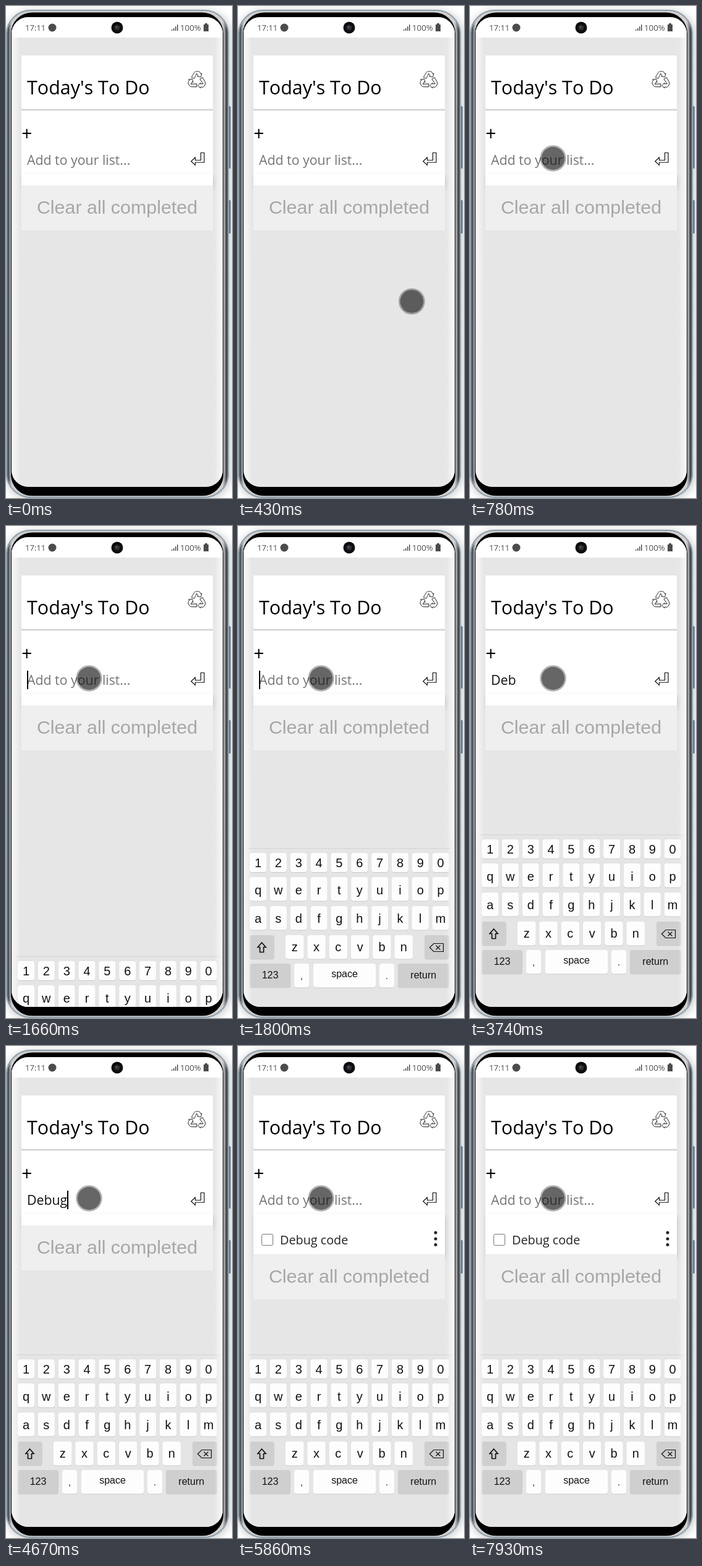
Recreate the animation shown at these times as an HTML page. Size 366 px wide and 796 px high, loop 8000 ms.

```html
<!DOCTYPE html>
<html lang="en">
<head>
<meta charset="utf-8">
<title>To-do list on a phone</title>
<style>
html, body { margin: 0; width: 100%; height: 100%; overflow: hidden; background: #fff; }
svg { display: block; width: 366px; height: 796px; }
text { font-family: "Open Sans", sans-serif; white-space: pre; }
.key text, .clear text { font-family: "Liberation Sans", Arial, sans-serif; text-anchor: middle; }
.key text { fill: #111; }
.title { font-kerning: none; }
.line { fill: none; stroke: #111; stroke-width: 1.2; }
</style>
</head>
<body>
<svg viewBox="0 0 366 796">
  <defs>
    <clipPath id="screen"><rect x="9" y="18" width="342" height="760" rx="27"/></clipPath>
    <filter id="soft" x="-20%" y="-20%" width="140%" height="140%"><feGaussianBlur stdDeviation="7"/></filter>
    <filter id="soft2" x="-20%" y="-60%" width="140%" height="220%"><feGaussianBlur stdDeviation="4"/></filter>
    <linearGradient id="sides" gradientUnits="userSpaceOnUse" x1="0" x2="361" y1="0" y2="0">
      <stop offset="0" stop-color="#8d9daa"/><stop offset=".006" stop-color="#59646d"/>
      <stop offset=".011" stop-color="#44494e"/><stop offset=".017" stop-color="#8c8e90"/>
      <stop offset=".025" stop-color="#cfcfcf"/><stop offset=".972" stop-color="#d2d2d2"/>
      <stop offset=".982" stop-color="#8c8e90"/><stop offset=".99" stop-color="#383c40"/>
      <stop offset=".995" stop-color="#5c6871"/><stop offset="1" stop-color="#9aabb7"/>
    </linearGradient>
    <linearGradient id="glow">
      <stop offset="0" stop-color="#fff" stop-opacity=".8"/><stop offset=".04" stop-color="#fff" stop-opacity="0"/>
      <stop offset=".96" stop-color="#fff" stop-opacity="0"/><stop offset="1" stop-color="#fff" stop-opacity=".8"/>
    </linearGradient>
    <path id="arm" d="M-9-5.5L-4.5-13Q-3.5-15-1-15H3Q4.5-15 5.3-12.8L6.5-10.4L8.2-11.4L6.3-5.6L.4-6.9L2-7.8L-.3-11.7L-4.5-3Z"/>
  </defs>

  <!-- phone body -->
  <rect x="0" y="8" width="364" height="790" rx="40" fill="#000" opacity=".22" filter="url(#soft)"/>
  <g fill="#71818d">
    <rect x="359" y="162" width="5" height="101" rx="1.5"/>
    <rect x="359" y="314" width="5" height="54" rx="1.5"/>
  </g>
  <rect x="0" y="6" width="361" height="790" rx="40" fill="url(#sides)"/>
  <rect x="1" y="7" width="359" height="788" rx="39" fill="none" stroke="#8ea0ad" stroke-width="2"/>
  <rect x="8" y="10.5" width="344" height="782" rx="34"/>

  <g clip-path="url(#screen)">
    <rect x="9" y="18" width="342" height="760" fill="#e6e6e6"/>
    <rect x="9" y="18" width="342" height="33" fill="#fff"/>

    <!-- status bar -->
    <g fill="#4c4c4c">
      <text x="31" y="40" font-size="13">17:11</text>
      <circle cx="75" cy="35" r="6.5"/>
      <path d="M268 38h1.5v2h-1.5zM271 36h1.5v4h-1.5zM274 33h1.5v7h-1.5zM277 30h1.5v10h-1.5z"/>
      <text x="282" y="40" font-size="13.3">100%</text>
      <path d="M322 28h4v2h2v11h-8v-11h2z"/>
    </g>
    <circle cx="180" cy="35" r="9.5" fill="#0c0c0c"/>
    <circle cx="180" cy="35" r="4.5" fill="#2b2e33"/>
    <circle cx="179" cy="34" r="1.5" fill="#555b63"/>

    <!-- list -->
    <rect id="shade" x="27" y="276" width="310" height="20" opacity=".1" filter="url(#soft2)"/>
    <rect x="25" y="80" width="310" height="210" fill="#fff"/>
    <rect x="25" y="167" width="310" height="2" fill="#ccc"/>
    <text class="title" x="34" y="143" font-size="30.4">Today's To Do</text>
    <g transform="translate(309.2 120.5) scale(.98)" fill="#fff" stroke="#111" stroke-width=".85">
      <use href="#arm"/><use href="#arm" transform="rotate(120)"/><use href="#arm" transform="rotate(240)"/>
    </g>
    <text x="25" y="216.5" font-size="30.4">+</text>
    <text id="entry" x="34" y="257" font-size="21.3"></text>
    <rect id="caret" y="234" width="2" height="30"/>
    <path class="line" d="M315.5 237.5H321V253H306.5V257.5L299.8 251.3L306.5 245V249.5H315.5Z"/>
    <rect x="31" y="270" width="304" height="1" fill="#f5f5f5"/>
    <g id="item">
      <rect x="25" y="290" width="310" height="47" fill="#fff"/>
      <rect x="38.5" y="304.5" width="18" height="18" rx="2" fill="#fff" stroke="#767676"/>
      <text x="68" y="321" font-size="19.8" fill="#222">Debug code</text>
      <g fill="#222"><circle cx="320" cy="302" r="2.5"/><circle cx="320" cy="312" r="2.5"/><circle cx="320" cy="321.5" r="2.5"/></g>
    </g>
    <g id="clear" class="clear">
      <rect x="25" y="290" width="310" height="73" fill="#efefef"/>
      <text x="180" y="336" font-size="30.4" fill="#a7a7a7">Clear all completed</text>
    </g>

    <g id="board">
      <rect x="9" y="499" width="342" height="290" fill="#e5e5e6"/>
      <rect x="9" y="499" width="342" height="1" fill="#d2d2d2"/>
      <g id="keys"></g>
      <path class="line" stroke-width="1.6" d="M38.5 652L45 659.5H41.5V667.5H35.5V659.5H32Z" style="stroke-width:1.7"/>
      <path class="line" d="M317 653.5H332.5V666.5H317L310.5 660ZM320.5 656.5l7 7m0-7l-7 7"/>
    </g>
    <rect x="9" y="51" width="342" height="727" fill="url(#glow)"/>
  </g>

  <g id="pointer">
    <circle r="18.8" fill-opacity=".6"/>
    <circle r="20" fill="none" stroke="#000" stroke-opacity=".3" stroke-width="2.6"/>
    <circle id="press" r="15" fill-opacity=".35"/>
  </g>
</svg>
<script>
const $ = id => document.getElementById(id);
const LOOP = 8000, SUBMIT = 5860, WORDS = 'Debug code';
const typedAt = [2730, 2800, 3210, 4340, 4670, 4800, 4940, 5000, 5200, 5330];
const caretOn = [[1660, 2070], [2600, 3740], [4270, SUBMIT], [6390, 6920], [7460, 7930]];
const presses = [[1380, 1520], [7120, 7260]];

// Keyboard
let keys = '';
function key(label, x, y, w, h, base, size = 20, fill = '#fdfdfd') {
  keys += `<g class="key"><rect x="${x}" y="${y + 1}" width="${w}" height="${h}" rx="4" fill="#cbcbcd"/>
    <rect x="${x}" y="${y}" width="${w}" height="${h}" rx="4" fill="${fill}"/>
    <text x="${x + w / 2}" y="${base}" font-size="${size}">${label}</text></g>`;
}
function row(chars, x, pitch, y, w, h, base) {
  [...chars].forEach((c, i) => key(c, x + i * pitch, y, w, h, base));
}
const dark = '#cfcfd0';
row('1234567890', 19, 32.85, 507, 27, 31, 530);
row('qwertyuiop', 19, 32.85, 546, 27, 38.5, 574);
row('asdfghjklm', 19, 32.85, 593, 27, 38.5, 620);
row('zxcvbn', 77, 35.3, 640, 29.5, 38.5, 666);
key('', 19, 640, 39.5, 38.5, 0, 20, dark);
key('', 302, 640, 39.5, 38.5, 0, 20, dark);
key('123', 19, 686, 66, 38.5, 710, 16, dark);
key(',', 91, 686, 24, 38.5, 711, 14);
key('space', 122, 686, 101, 38.5, 708, 16);
key('.', 229, 686, 24, 38.5, 711, 14);
key('return', 259, 686, 82.5, 38.5, 710, 16, dark);
$('keys').innerHTML = keys;

const within = (t, spans) => spans.some(([a, b]) => t >= a && t < b);
const show = (id, on) => $(id).setAttribute('visibility', on ? 'visible' : 'hidden');
const move = (id, x, y) => $(id).setAttribute('transform', `translate(${x} ${y})`);

function draw(t) {
  // Pointer glides in over eight discrete positions
  const s = Math.min(7, Math.max(0, Math.floor((t - 300) / 68.5))) / 7;
  const left = (1 - s) ** 2;
  show('pointer', t >= 300);
  show('press', within(t, presses));
  move('pointer', 134.5 + 200 * left, 246.5 + 315 * left);

  // Keyboard slides up in 70 ms steps
  const k = Math.min(1870, 1660 + 70 * Math.floor((t - 1660) / 70));
  show('board', t >= 1660);
  move('board', 0, Math.round(279 * ((1870 - k) / 250) ** 2));

  const done = t >= SUBMIT;
  const count = done ? 0 : typedAt.filter(a => t >= a).length;
  const entry = $('entry');
  entry.textContent = count ? WORDS.slice(0, count) : 'Add to your list...';
  entry.setAttribute('fill', count ? '#111' : '#757575');
  const width = count ? entry.getComputedTextLength() : 0;
  $('caret').setAttribute('x', Math.floor(34 + width));
  show('caret', within(t, caretOn));

  show('item', done);
  move('clear', 0, done ? 46.5 : 0);
  $('shade').setAttribute('height', done ? 66 : 20);
}

const start = performance.now();
function tick() {
  draw((performance.now() - start) % LOOP);
  requestAnimationFrame(tick);
}
tick();
</script>
</body>
</html>
```
